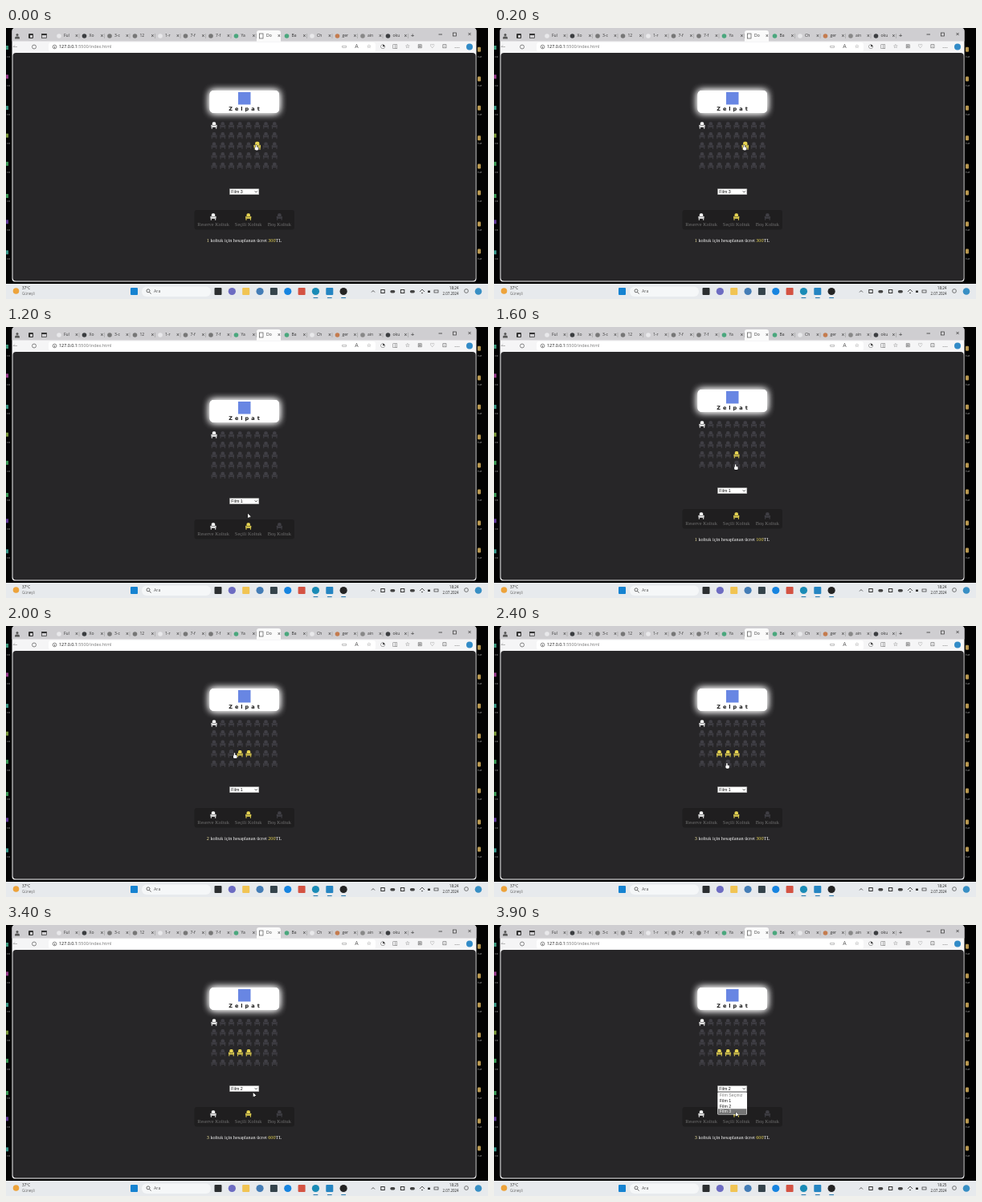
These frames come from a looping animation (600 by 338 pixels, 4100 ms). An HTML page with a canvas:

```html
<!DOCTYPE html>
<html lang="tr">
<head>
<meta charset="utf-8">
<title>Koltuk seçimi</title>
<style>
html, body { margin: 0; width: 100%; height: 100%; overflow: hidden; background: #000; }
canvas { display: block; width: 600px; height: 338px; }
</style>
</head>
<body>
<canvas id="stage" width="600" height="338"></canvas>
<script>
const ctx = document.getElementById('stage').getContext('2d');
const LOOP = 4100, STEP = 100;
const SANS = '"Liberation Sans", Arial, sans-serif';
const SERIF = '"Liberation Serif", "Times New Roman", serif';
const WIDE = '"DejaVu Sans", sans-serif';
const UI = '"Open Sans", "Noto Sans", sans-serif';
const DIM = '#403f45', YELLOW = '#e5d352', WHITE = '#f4f4f4', INK = '#555';

// Page geometry with the price line showing; without it the page sits lower.
const DROP = 13, LIST_TOP = 209, ROW = 6.75;
const seatCenter = (row, col) => [259 + col * 10.75, 121.5 + row * 12.6];
const overSeat = (row, col) => {
  const [x, y] = seatCenter(row, col);
  return [x - 1.5, y - 1];
};
const overOption = i => [301, LIST_TOP + (i + 0.6) * ROW];
const overMenu = [310, 203];
const lower = ([x, y]) => [x, y + DROP];

const bookings = [
  { row: 2, col: 5, from: 0, to: 300 },
  ...[1500, 1900, 2100].map((from, i) => ({ row: 3, col: 4 - i, from, to: LOOP }))
];
const menuTimes = [[800, 1100], [2700, 3200], [3500, LOOP]];
const route = [
  [0, overSeat(2, 5)], [300, overSeat(2, 5)],
  [700, lower(overMenu)], [800, lower(overMenu)],
  [1000, lower(overOption(1))], [1200, lower(overOption(1))],
  [1500, lower(overSeat(3, 4))], [1600, lower(overSeat(3, 4))],
  [1900, overSeat(3, 3)], [2100, overSeat(3, 2)], [2400, overSeat(4, 3)],
  [2700, overMenu], [2900, overOption(1)], [3000, overOption(1)],
  [3200, overOption(2)], [3500, overMenu], [3900, overOption(3)], [LOOP, overOption(3)]
];

const during = (t, from, to) => t >= from && t < to;
const filmAt = t => t < 1100 ? 3 : t < 3200 ? 1 : 2;

function pointerAt(t) {
  const i = route.findIndex(([time]) => time > t);
  const [t0, a] = route[i - 1], [t1, b] = route[i];
  const u = (t - t0) / (t1 - t0), ease = u * u * (3 - 2 * u);
  return a.map((v, k) => v + (b[k] - v) * ease);
}

function seeded(seed) {
  return () => (seed = (seed * 16807) % 2147483647) / 2147483647;
}

function box(x, y, w, h, color, r = 0) {
  ctx.fillStyle = color;
  ctx.beginPath();
  ctx.roundRect(x, y, w, h, r);
  ctx.fill();
}

function frame(x, y, w, h, color, width = 0.7) {
  ctx.strokeStyle = color;
  ctx.lineWidth = width;
  ctx.strokeRect(x, y, w, h);
}

function dot(x, y, r, color) {
  box(x - r, y - r, 2 * r, 2 * r, color, r);
}

function ring(x, y, r, color) {
  ctx.strokeStyle = color;
  ctx.lineWidth = 0.7;
  ctx.beginPath();
  ctx.arc(x, y, r, 0, Math.PI * 2);
  ctx.stroke();
}

function line(color, ...points) {
  ctx.strokeStyle = color;
  ctx.lineWidth = 0.8;
  ctx.beginPath();
  points.forEach(([x, y]) => ctx.lineTo(x, y));
  ctx.stroke();
}

// A small angle mark; dir 1 points down, -1 points up.
function chevron(x, y, size, dir, color) {
  line(color, [x - size, y - dir * size / 2], [x, y + dir * size / 2], [x + size, y - dir * size / 2]);
}

function text(str, x, y, size, color, family = UI, align = 'left', weight = 'normal') {
  ctx.font = `${weight} ${size}px ${family}`;
  ctx.fillStyle = color;
  ctx.textAlign = align;
  ctx.textBaseline = 'middle';
  ctx.fillText(str, x, y);
  return ctx.measureText(str).width;
}

function desktop() {
  const random = seeded(11);
  box(0, 0, 600, 338, '#020202');
  for (let y = 22; y < 300; y += 36) {
    box(0, y + random() * 6, 3, 5, `hsl(${random() * 360} 45% 40%)`);
    text('co', 1, y + 14, 4, '#999');
    box(587, y + random() * 6, 4, 6, '#b8974f', 1);
    text('tur', 587, y + 14, 4, '#aaa');
  }
}

function tabs() {
  box(7.5, 0, 578, 316.5, '#f5f5f6', 4);
  box(7.5, 0, 578, 16.5, '#cfced1', [4, 4, 0, 0]);
  dot(14, 8.5, 1.5, INK);
  box(11, 10.5, 6, 3, INK, [2, 2, 0, 0]);
  box(28, 7, 6, 6, '#333', 1);
  box(30, 9, 3, 3, '#cfced1');
  frame(44.5, 7.5, 6, 5, '#333');
  box(44.5, 7, 6, 2, '#333');

  const titles = ['Ful', 'Xo', '3-c', '12', '1-r', '7-f', '7-f', 'Ya', 'Do', 'Ba', 'Ch', 'ger', 'ain', 'oku'];
  const light = '#e9e9eb', dark = '#3b3d40', green = '#4aa77d';
  const colors = [light, dark, '#777', '#777', light, '#777', '#777', green, light, green, light, '#c47b4e', '#888', dark];
  titles.forEach((title, i) => {
    const x = 66 + i * 31.5, active = title === 'Do';
    if (active) {
      box(x - 6, 3, 30, 14, '#fafafa', [3, 3, 0, 0]);
      frame(x - 2.5, 7, 4.5, 6, INK);
    } else {
      dot(x, 10, 2.8, colors[i]);
      line('#aaa', [x + 25, 7], [x + 25, 13]);
    }
    text(title, x + 6, 10, 5, '#333');
    text('×', x + 22, 10, 6.5, '#333', SANS, 'center');
  });
  text('+', 506, 10, 8, '#333', SANS, 'center');
  line('#333', [538.5, 8], [543, 8]);
  frame(556.5, 6, 4, 4, '#333');
  text('×', 577, 8, 8, '#333', SANS, 'center');
}

function toolbar() {
  box(53, 18, 407, 11.5, '#fff', 3);
  line('#aaa', [14, 23.5], [9, 23.5], [11, 21.5]);
  ring(35, 23.5, 2.5, INK);
  ring(60.5, 23.5, 2.3, INK);
  line(INK, [60.5, 23], [60.5, 25]);
  const hostWidth = text('127.0.0.1', 66, 23.5, 5.4, '#111');
  text(':5500/index.html', 66 + hostWidth, 23.5, 5.4, '#777');
  [...'▭A☆'].forEach((mark, i) => text(mark, 421 + i * 15.5, 23.5, 6.5, INK, WIDE, 'center'));
  [...'◔◫☆⊞♡⊡…'].forEach((mark, i) => text(mark, 469 + i * 15.4, 23.5, 7, '#444', WIDE, 'center'));
  dot(577, 23.5, 4, '#328bc7');
}

function taskbar(clock) {
  box(0, 319, 600, 19, '#e7eaed');
  dot(12.5, 328, 3.8, '#eda33b');
  text('37°C', 20, 325, 4.6, '#222');
  text('Güneşli', 20, 332, 4.5, '#666');
  box(155, 324, 9, 9, '#1683d1', 1);
  box(169, 322.5, 86, 12.5, '#f5f7f8', 6);
  ring(177, 327.8, 2, '#333');
  line('#333', [178.5, 329.5], [180.5, 331.5]);
  text('Ara', 184, 328.5, 5.3, '#555');

  const apps = ['#2b2e30', '#6d6cc2', '#f1c453', '#447db6', '#34434b', '#1684e0',
    '#d45343', '#198bb6', '#2585c2', '#242424'];
  apps.forEach((color, i) => {
    const x = 264 + i * 17.35;
    if (i % 2) dot(x, 328.5, 4.6, color);
    else box(x - 4.5, 324, 9, 9, color, 1);
    if (i > 6) box(x - 3, 336, 6, 1, '#2377ac', 0.5);
  });

  chevron(457, 328.5, 2, -1, '#333');
  for (let i = 0; i < 4; i++) {
    const x = 469 + i * 12.3;
    if (i % 2) box(x - 3, 327, 6, 3.5, '#444', 1.7);
    else frame(x - 2.2, 326.5, 4.4, 4, '#333', 1);
  }
  chevron(518, 327.5, 3, -1, '#333');
  dot(518, 330.5, 0.8, '#333');
  box(525, 327.5, 3, 2.5, '#333');
  frame(533, 327, 5, 3, '#333');
  text(clock, 563.5, 325, 4.6, '#222', UI, 'right');
  text('2.07.2024', 563.5, 332, 4.4, '#222', UI, 'right');
  ring(573, 328, 2.4, '#444');
  dot(588, 328.5, 4.3, '#388fc4');
}

function seat([x, y], color, scale = 1) {
  ctx.save();
  ctx.translate(x, y);
  ctx.scale(scale, scale);
  box(-2.2, -4.2, 4.4, 4.2, color, [1.5, 1.5, 0.3, 0.3]);
  box(-2.6, 0.5, 5.2, 1.7, color, 0.4);
  for (const side of [-1, 1]) {
    box(side * 2.9 - 0.6, -0.8, 1.2, 3, color, 0.5);
    box(side * 2.7 - 0.5, 2, 1, 2.2, color);
  }
  ctx.restore();
}

function brand() {
  ctx.save();
  ctx.shadowColor = '#fff';
  ctx.shadowBlur = 10;
  for (let pass = 0; pass < 2; pass++) box(253.5, 78, 86.5, 28, '#fff', 5);
  ctx.restore();
  box(289, 80, 15.5, 15.5, '#6886e3');
  ctx.letterSpacing = '3px';
  text('Zelpat', 298, 101, 6.5, '#171717', WIDE, 'center', 'bold');
  ctx.letterSpacing = '0px';
}

function legend() {
  box(234.5, 227, 124.5, 24.5, '#1f1e1f', 3);
  const entries = [['Reserve', WHITE], ['Seçili', YELLOW], ['Boş', DIM]];
  entries.forEach(([label, color], i) => {
    const x = 258 + i * 41.2 + (i === 1 ? 2.5 : 0);
    seat([x, 235.5], color);
    text(label + ' Koltuk', x, 245.7, 6.35, '#707070', SERIF, 'center');
  });
}

function price(count, film) {
  const parts = [[count, '#f2e6a0'], [' koltuk için hesaplanan ücret ', WHITE],
    [count * film * 100, YELLOW], ['TL', WHITE]];
  let x = 249.7;
  for (const [part, color] of parts) x += text(String(part), x, 265, 6.25, color, SERIF);
}

function dropdown(film, open, pointerY) {
  box(278.3, 200.5, 36.7, 7.4, '#fff', 0.7);
  frame(278.5, 200.7, 36.3, 7, '#777', 0.5);
  text('Film ' + film, 280.3, 204.5, 5.3, '#111', SANS);
  chevron(311.3, 204.2, 1.5, 1, '#222');
  if (!open) return;
  const row = Math.floor((pointerY - LIST_TOP) / ROW);
  const hovered = row < 0 ? film : Math.min(3, row);
  box(278.3, LIST_TOP - 0.4, 36.7, 28, '#fff', 1);
  ['Film Seçiniz', 'Film 1', 'Film 2', 'Film 3'].forEach((label, i) => {
    const y = LIST_TOP + i * ROW;
    if (i === hovered) box(278.9, y, 35.5, ROW, '#747474');
    text(label, 280.8, y + 3.6, 5.3, i === hovered ? '#fff' : i ? '#161616' : '#808080', SANS);
  });
}

function pointer([x, y], hand) {
  const outline = new Path2D();
  if (hand) {
    outline.roundRect(x - 0.6, y, 1.5, 5, 0.7);
    outline.roundRect(x - 1.4, y + 2.8, 4.6, 4, 1.4);
  } else {
    [[0, 0], [0, 5.4], [1.4, 4.2], [2.6, 6], [2.2, 3.9], [3.9, 3.8]]
      .forEach(([dx, dy]) => outline.lineTo(x + dx, y + dy));
    outline.closePath();
  }
  ctx.strokeStyle = '#111';
  ctx.lineWidth = 0.9;
  ctx.stroke(outline);
  ctx.fillStyle = '#fff';
  ctx.fill(outline);
}

function page(t) {
  const booked = bookings.filter(({ from, to }) => during(t, from, to));
  const open = menuTimes.some(([from, to]) => during(t, from, to));
  const film = filmAt(t), tip = pointerAt(t);
  const shift = booked.length ? 0 : DROP;
  let hand = false;
  box(8.5, 31, 576.2, 284.6, '#272628', 4);
  ctx.save();
  ctx.translate(0, shift);
  brand();
  for (let row = 0; row < 5; row++) {
    for (let col = 0; col < 8; col++) {
      const center = seatCenter(row, col), [x, y] = center;
      const reserved = row + col === 0;
      const chosen = booked.some(b => b.row === row && b.col === col);
      const hover = !reserved && Math.abs(tip[0] - x) < 4.5 && Math.abs(tip[1] + 1 - shift - y) < 5;
      hand = hand || hover;
      seat(center, reserved ? WHITE : chosen ? YELLOW : DIM, hover ? 1.2 : 1);
    }
  }
  legend();
  dropdown(film, open, tip[1] - shift);
  ctx.restore();
  if (booked.length) price(booked.length, film);
  pointer(tip, hand);
}

function draw(now) {
  const t = Math.floor((now % LOOP) / STEP) * STEP;
  desktop();
  tabs();
  toolbar();
  page(t);
  taskbar(t < 3300 ? '18:24' : '18:25');
  requestAnimationFrame(draw);
}

requestAnimationFrame(draw);
</script>
</body>
</html>
```
